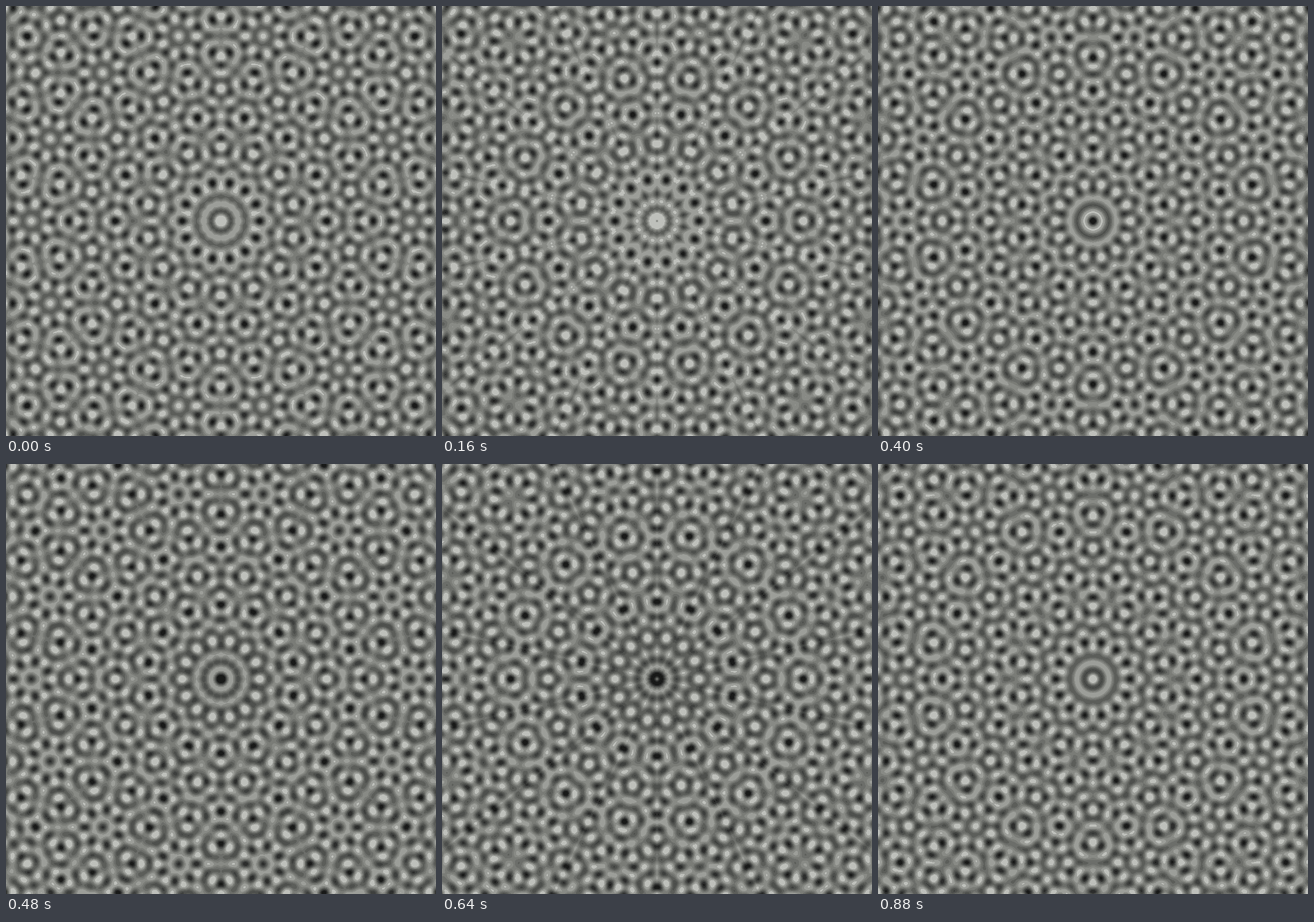
An HTML page with a canvas that plays this animation: 748 by 748 pixels, repeating every 0.96 s.

```html
<!DOCTYPE html>
<html lang="en">
<head>
<meta charset="utf-8">
<title>Quasicrystal waves</title>
<style>
  html, body { margin: 0; width: 100%; height: 100%; overflow: hidden; background: #7a7c77; }
  canvas { display: block; width: 748px; height: 748px; }
</style>
</head>
<body>
<canvas id="stage" width="748" height="748"></canvas>
<script>
const SIZE = 748, HALF = SIZE / 2;
const WAVES = 7, CYCLES = 30;
const STEPS = 12, STEP_MS = 80;

// Upper limit of the wave sum for each tone, darkest first.
const TONES = [
  [-4.6, 24, 25, 24],
  [-3.6, 44, 45, 44],
  [-2.8, 62, 64, 62],
  [-2.0, 78, 80, 77],
  [-1.2, 92, 94, 90],
  [-0.4, 108, 110, 106],
  [0.4, 122, 124, 119],
  [1.2, 136, 138, 133],
  [2.6, 156, 158, 153],
  [Infinity, 190, 192, 187]
];

// Lookup from the wave sum to a packed pixel.
const LOOKUP_SCALE = 50;
const lookup = new Uint32Array(2 * WAVES * LOOKUP_SCALE + 2);
for (let i = 0; i < lookup.length; i++) {
  const [, r, g, b] = TONES.find(tone => i / LOOKUP_SCALE - WAVES < tone[0]);
  lookup[i] = (255 << 24 | b << 16 | g << 8 | r) >>> 0;
}

// Cosine and sine sums over one quadrant; any phase is a mix of the two.
const cosSum = new Float32Array(HALF * HALF);
const sinSum = new Float32Array(HALF * HALF);
const waveNumber = 2 * Math.PI * CYCLES / SIZE;
for (let j = 0; j < WAVES; j++) {
  const kx = waveNumber * Math.cos(j * Math.PI / WAVES);
  const ky = waveNumber * Math.sin(j * Math.PI / WAVES);
  for (let y = 0, i = 0; y < HALF; y++) {
    for (let x = 0; x < HALF; x++, i++) {
      const distance = Math.abs(kx * (x + 0.5) + ky * (y + 0.5));
      cosSum[i] += Math.cos(distance);
      sinSum[i] += Math.sin(distance);
    }
  }
}

const ctx = document.getElementById('stage').getContext('2d');
const image = ctx.createImageData(SIZE, SIZE);
const pixels = new Uint32Array(image.data.buffer);

function draw(step) {
  const phase = (step + 1) * 2 * Math.PI / STEPS;
  const c = Math.cos(phase), s = Math.sin(phase);
  for (let y = 0, i = 0; y < HALF; y++) {
    const below = (HALF + y) * SIZE + HALF;
    const above = (HALF - 1 - y) * SIZE + HALF;
    for (let x = 0; x < HALF; x++, i++) {
      const sum = c * cosSum[i] + s * sinSum[i];
      const color = lookup[Math.max(0, (sum + WAVES) * LOOKUP_SCALE | 0)];
      pixels[below + x] = pixels[below - 1 - x] = color;
      pixels[above + x] = pixels[above - 1 - x] = color;
    }
  }
  ctx.putImageData(image, 0, 0);
}

const start = performance.now();
let shown = -1;

function tick() {
  const step = Math.floor((performance.now() - start) / STEP_MS) % STEPS;
  if (step !== shown) draw(shown = step);
  requestAnimationFrame(tick);
}
tick();
</script>
</body>
</html>
```
